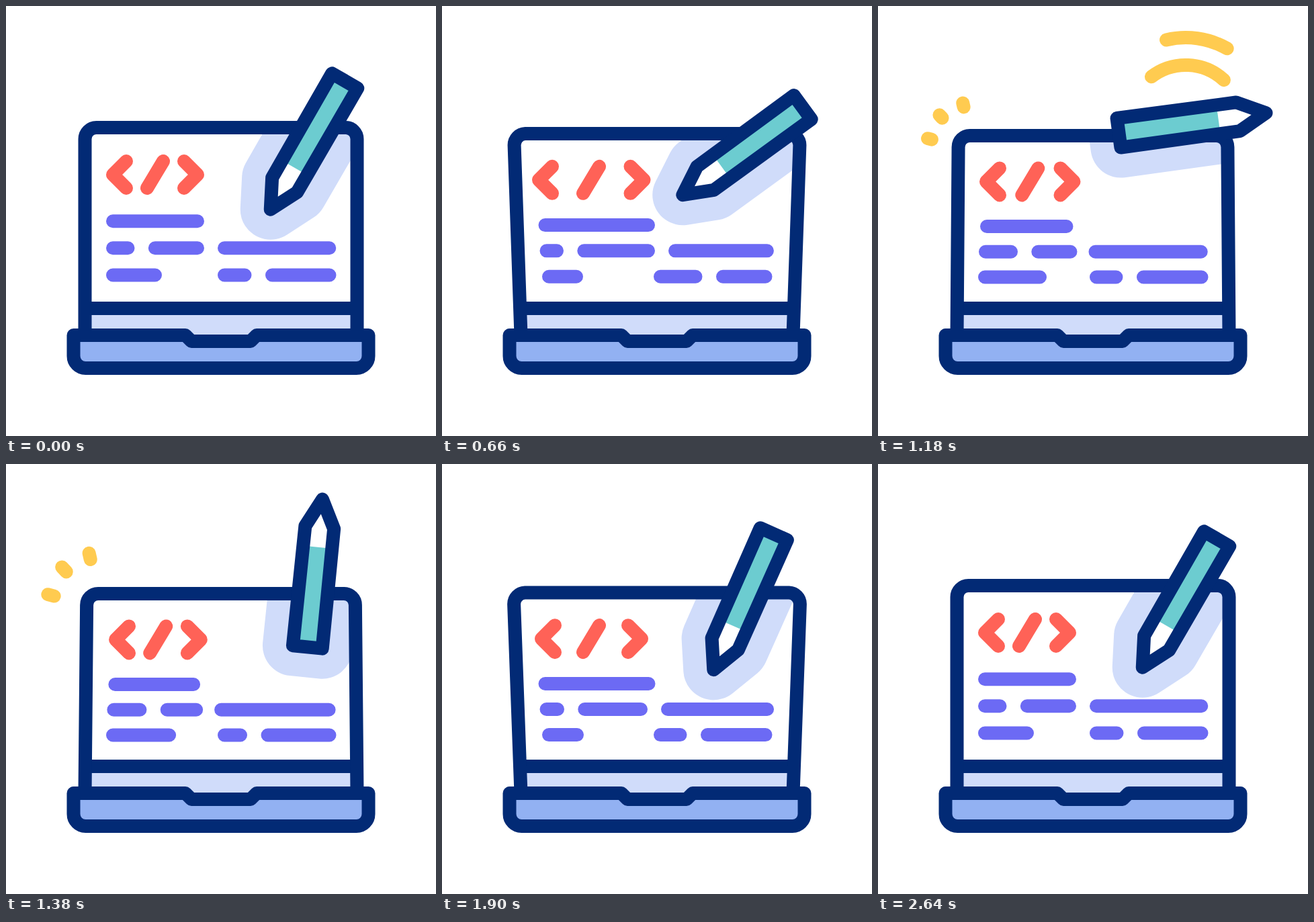
An HTML page that plays this animation: 640x640 px, repeating every 3 s.

```html
<!DOCTYPE html>
<html lang="en">
<head>
<meta charset="utf-8">
<title>Laptop and pencil</title>
<style>
  html, body { margin: 0; width: 100%; height: 100%; overflow: hidden; background: #fff; }
  svg { display: block; width: 100%; height: 100%; }
  .line { fill: none; stroke-width: 20; stroke-linecap: round; stroke-linejoin: round; }
  .navy { stroke: #022a75; }
  .red { stroke: #ff6257; }
  .violet { stroke: #6c6af4; }
  .yellow { stroke: #ffcb50; }
</style>
</head>
<body>
<svg viewBox="0 0 640 640">
  <defs>
    <clipPath id="screen"><path id="screenShape"/></clipPath>
    <path id="pencilShape" d="M0 0L-21.5 -42L-22 -221H22L21.5 -42Z"/>
  </defs>
  <g clip-path="url(#screen)">
    <use id="shadow" href="#pencilShape" fill="#d0dcfa" stroke="#d0dcfa" stroke-width="90" stroke-linejoin="round"/>
    <path id="bars" class="line violet"/>
    <path id="tags" class="line red"/>
    <path d="M100 450H540V490H100Z" fill="#d0dcfa"/>
    <path d="M100 450H540" class="line navy"/>
  </g>
  <path id="lid" class="line navy"/>
  <path class="line navy" style="fill:#92b1f2"
    d="M100.5 490H267L276 499H364L373 490H539.5V521a18 18 0 0 1-18 18H118.5a18 18 0 0 1-18-18Z"/>
  <path id="sparks" class="line yellow"/>
  <path id="arcs" class="line yellow"/>
  <g id="pencil">
    <use href="#pencilShape" fill="#fff"/>
    <path d="M-22 -71.5H22V-221H-22Z" fill="#6cccd0"/>
    <use href="#pencilShape" class="line navy"/>
  </g>
</svg>
<script>
const LOOP = 3000;
const $ = id => document.getElementById(id);

// Monotone cubic track: rests at both ends and at every turning point.
function track(times, values) {
  const last = times.length - 1;
  const rate = i => (values[i + 1] - values[i]) / (times[i + 1] - times[i]);
  const slopes = values.map((_, i) => {
    if (i === 0 || i === last) return 0;
    const a = rate(i - 1), b = rate(i);
    return a * b > 0 ? 2 * a * b / (a + b) : 0;
  });
  return t => {
    if (t <= times[0]) return values[0];
    if (t >= times[last]) return values[last];
    const i = times.findIndex(x => x > t) - 1;
    const span = times[i + 1] - times[i];
    const u = (t - times[i]) / span, v = 1 - u;
    return v * v * (1 + 2 * u) * values[i] + u * u * (3 - 2 * u) * values[i + 1]
      + span * u * v * (v * slopes[i] - u * slopes[i + 1]);
  };
}

// Poses: rest, lean forward, lean back (twice), forward again (twice), rest.
const POSES = [220, 660, 1180, 1600, 1900, 2160, 2640];
const pose = (...values) => track(POSES, [...values, values[0]]);

const lidTop = pose(181, 190, 193, 193, 191.5, 190);
const flare = pose(0, 10.5, -2.2, -3, 11, 10.5);
const row1 = [pose(159, 153.5, 162, 162.5, 153.5, 154), pose(285, 307, 280.5, 278.5, 307.5, 306)];
const row2Start = pose(159, 155.5, 160, 160.5, 155.5, 155.5);
const row2Gap = pose(181.5, 171, 198, 200, 172, 171.5);
const row2Mid = [pose(285, 307, 286.5, 281.5, 296, 295.5), pose(325, 347, 323.5, 318.5, 336, 335.5)];
const row3End = pose(222, 200, 241, 244, 201, 201);
const row3Gap = pose(355.5, 377.5, 354.5, 346, 354.5, 355.5);
const openTag = pose(159, 144, 161, 164, 148, 148.5);
const slash = pose(234, 234, 238.3, 238, 234, 234);
const closeTag = pose(285, 300.5, 291.5, 289, 297, 296);

const pencilX = pose(449, 447.5, 468, 450, 449, 451);
const pencilY = pose(207, 216, 174, 156, 205, 242);
const pencilAngle = track([220, 520, 660, 1180, 1600, 1900, 2160, 2640],
  [30, 69, 54, -97.4, -256.6, -336, -352.2, -330]);

const sparkHead = track([1080, 1180, 1280, 1600, 1800], [0, 10, 17, 31, 36]);
const sparkTail = track([1080, 1180, 1600, 1800], [0, 4, 23, 36]);
const SPARKS = [[83.8, 199.7, 194.5], [98.3, 169.6, 227], [128.5, 154.3, 257.3]];

const swoosh = (x, y, r, times, head, tail) =>
  ({ x, y, r, head: track(times, head), tail: track(times, tail) });
const SWOOSHES = [
  swoosh(458, 172, 125, [1000, 1180, 1340], [5, -103, -150], [5, -60, -150]),
  swoosh(458, 172, 84, [1000, 1180, 1340], [0, -127, -170], [0, -47, -170]),
  swoosh(450, 157, 131, [1480, 1600, 1800], [100, 38, -25], [100, 87, -25])
];

const polar = (x, y, r, degrees) => {
  const a = degrees * Math.PI / 180;
  return `${x + r * Math.cos(a)} ${y + r * Math.sin(a)}`;
};
const bar = (x1, x2, y) => `M${x1} ${y}H${x2}`;
const chevron = (x, y, dx) => `M${x + dx} ${y - 20}L${x} ${y}L${x + dx} ${y + 20}`;

function drawLaptop(t) {
  const top = lidTop(t), d = flare(t), drop = top - 181;
  const r = 17, inset = d * r / (490 - top);
  const left = 117.5 - d, right = 522.5 + d;
  const lid = `M117.5 490L${left + inset} ${top + r}A${r} ${r} 0 0 1 ${left + r} ${top}`
    + `H${right - r}A${r} ${r} 0 0 1 ${right - inset} ${top + r}L522.5 490`;
  $('lid').setAttribute('d', lid);
  $('screenShape').setAttribute('d', lid + 'Z');

  const y1 = 320.3 + drop * 0.64, y2 = 360.3 + drop * 0.45, y3 = 400.5 + drop * 0.25;
  const gap2 = row2Gap(t), gap3 = row3Gap(t);
  $('bars').setAttribute('d', [
    bar(row1[0](t), row1[1](t), y1),
    bar(row2Start(t), gap2, y2),
    bar(gap2 + 40.3, row2Mid[0](t), y2),
    bar(row2Mid[1](t), 481.3 + d * 0.25, y2),
    bar(159, row3End(t), y3),
    bar(325, gap3, y3),
    bar(gap3 + 40.5, 481.5, y3)
  ].join(''));

  const y = 251 + drop * 0.87, s = slash(t);
  $('tags').setAttribute('d', chevron(openTag(t), y, 20)
    + `M${s} ${y - 20}L${s - 24} ${y + 20}` + chevron(closeTag(t), y, -20));
}

function drawPencil(t) {
  const move = `translate(${pencilX(t)} ${pencilY(t)}) rotate(${pencilAngle(t)}) translate(0 110.5)`;
  $('pencil').setAttribute('transform', move);
  $('shadow').setAttribute('transform', move);
}

function drawEffects(t) {
  const head = sparkHead(t), tail = sparkTail(t);
  $('sparks').setAttribute('d', head - tail < 0.1 ? '' : SPARKS.map(([x, y, a]) =>
    `M${polar(x, y, tail, a)}L${polar(x, y, head, a)}`).join(''));
  $('arcs').setAttribute('d', SWOOSHES.map(({ x, y, r, head, tail }) => {
    const from = tail(t), to = head(t);
    return from - to < 0.5 ? '' : `M${polar(x, y, r, from)}A${r} ${r} 0 0 0 ${polar(x, y, r, to)}`;
  }).join(''));
}

function draw(t) {
  drawLaptop(t);
  drawPencil(t);
  drawEffects(t);
}

const start = performance.now();
function tick() {
  draw((performance.now() - start) % LOOP);
  requestAnimationFrame(tick);
}
tick();
</script>
</body>
</html>
```
